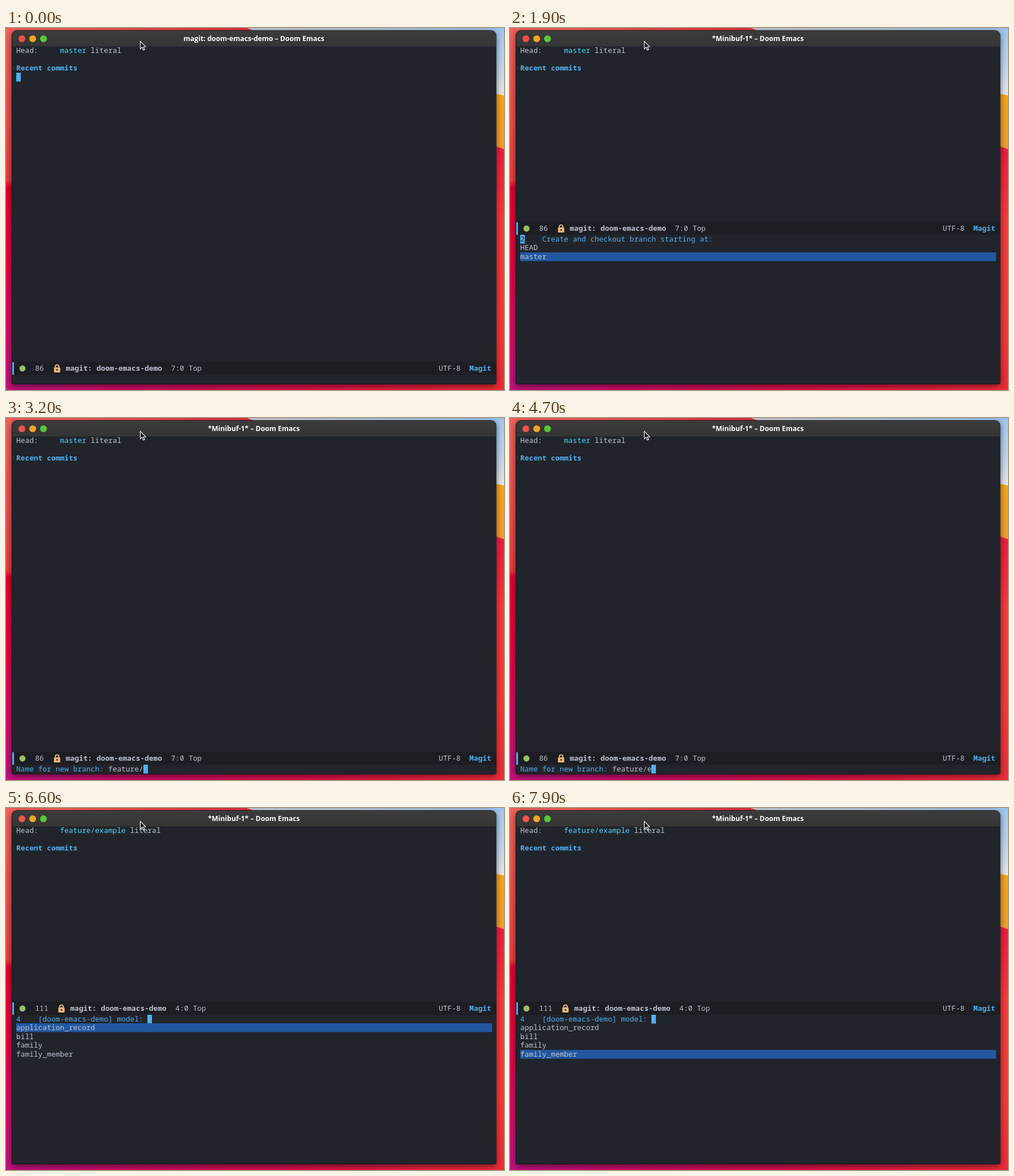
These frames come from a looping animation (877x639 px, 8000 ms). An HTML page with a canvas:

```html
<!DOCTYPE html>
<html lang="en">
<head>
<meta charset="utf-8">
<title>Branching in Magit</title>
<style>
html, body { margin: 0; width: 100%; height: 100%; overflow: hidden; background: #d01040; }
canvas { display: block; width: 877px; height: 639px; }
</style>
</head>
<body>
<canvas id="stage" width="877" height="639"></canvas>
<script>
const ctx = document.getElementById('stage').getContext('2d');
const LOOP = 8000, CELL = 7.712, ROW = 15.45, LEFT = 18;
const MONO = '12.85px "Noto Sans Mono", "DejaVu Sans Mono", monospace';
const UI = 'bold 12.2px "Open Sans", "Noto Sans", sans-serif';
const C = {
  bg: '#21242b', bar: '#1c1e23', text: '#bbc2cf', blue: '#51afef', cyan: '#46d9ff',
  green: '#98be65', lock: '#eab676', select: '#2257a0', dim: '#5b6268', key: '#c678dd'
};
const REPO = 'magit: doom-emacs-demo', MINI = '*Minibuf-1*';
const BRANCH = 'feature/example', PROMPT = 'Name for new branch: ';
const START = '2    Create and checkout branch starting at: ';
const MODEL = '4    [doom-emacs-demo] model: ';
const REFS = ['HEAD', 'master'];
const MODELS = ['application_record', 'bill', 'family', 'family_member'];

// [time, letters of the branch name typed so far]
const TYPED = [[2000, 0], [2100, 2], [2200, 3], [2400, 4], [2600, 6], [2800, 7], [3200, 8],
  [4700, 9], [5000, 10], [5100, 11], [5200, 12], [5400, 13], [5500, 15]];

function rect(x, y, w, h, color) {
  ctx.fillStyle = color;
  ctx.fillRect(x, y, w, h);
}

function disc(x, y, r, color) {
  ctx.fillStyle = color;
  ctx.beginPath();
  ctx.arc(x, y, r, 0, Math.PI * 2);
  ctx.fill();
}

function poly(points, color) {
  ctx.fillStyle = color;
  ctx.beginPath();
  points.forEach(p => ctx.lineTo(p[0], p[1]));
  ctx.closePath();
  ctx.fill();
}

function gradient(x0, y0, x1, y1, stops) {
  const g = ctx.createLinearGradient(x0, y0, x1, y1);
  stops.forEach(([at, color]) => g.addColorStop(at, color));
  return g;
}

// Monospaced text on the cell grid
function write(str, x, base, color, bold) {
  ctx.font = (bold ? 'bold ' : '') + MONO;
  ctx.textAlign = 'left';
  ctx.fillStyle = color;
  [...str].forEach((ch, i) => {
    if (ch !== ' ') ctx.fillText(ch, x + i * CELL, base);
  });
}

const col = n => LEFT + n * CELL;

function cursor(n, top) {
  rect(Math.round(col(n)), Math.round(top), 8, 15.5, C.blue);
}

function desktop() {
  rect(0, 0, 877, 639, gradient(0, 0, 0, 639, [[0, '#f4625a'], [0.3, '#ee4a48'],
    [0.42, '#f03c40'], [0.44, '#e4002f'], [0.62, '#ea0440'], [0.8, '#dc0a62'], [1, '#c21080']]));
  rect(0, 625, 877, 14, gradient(0, 0, 877, 0, [[0, '#c41280'], [0.3, '#cc0c60'],
    [0.6, '#dc1048'], [1, '#ee2c38']]));
  rect(100, 0, 400, 8, gradient(100, 0, 500, 0, [[0, 'rgba(222,40,56,0)'], [1, '#de2838']]));
  poly([[424, 0], [877, 0], [877, 130], [850, 130], [850, 10], [450, 10]],
    gradient(440, 0, 877, 0, [[0, '#c8ccd6'], [0.5, '#b4c8dc'], [1, '#9cc4ee']]));
  rect(850, 5, 27, 125, gradient(0, 5, 0, 118, [[0, '#a2c8f0'], [0.6, '#c4d8ee'], [1, '#e8e8ea']]));
  poly([[850, 114], [877, 119], [877, 214], [850, 205]],
    gradient(0, 115, 0, 214, [[0, '#f6a418'], [1, '#f0a030']]));
  poly([[850, 205], [877, 214], [877, 639], [850, 639]],
    gradient(0, 210, 0, 639, [[0, '#ee1c40'], [0.3, '#f83a3c'], [0.7, '#f63a38'], [1, '#ee2c38']]));
}

function shell(title) {
  ctx.save();
  ctx.shadowColor = 'rgba(0,0,0,.55)';
  ctx.shadowBlur = 12;
  ctx.shadowOffsetY = 3;
  ctx.fillStyle = '#15161a';
  ctx.beginPath();
  ctx.roundRect(10, 4, 853.5, 625, [9, 9, 3, 3]);
  ctx.fill();
  ctx.restore();
  ctx.fillStyle = gradient(0, 5, 0, 32, [[0, '#414141'], [0.1, '#3b3b3b'], [1, '#353535']]);
  ctx.beginPath();
  ctx.roundRect(11, 5, 852, 28, [8, 8, 0, 0]);
  ctx.fill();
  rect(11, 32.5, 852, 595.5, C.bg);
  disc(28, 19, 6, '#f0524a');
  disc(47, 19, 6, '#f1a61e');
  disc(66, 19, 6, '#57c936');
  ctx.font = UI;
  ctx.textAlign = 'center';
  ctx.fillStyle = '#fff';
  ctx.fillText(title + ' – Doom Emacs', 436.5, 23);
}

function status(branch) {
  write('Head:', LEFT, 44, C.text);
  write(branch, col(10), 44, C.cyan);
  write('literal', col(11 + branch.length), 44, C.text);
  write('Recent commits', LEFT, 75, C.blue, true);
  ctx.strokeStyle = '#444a53';
  ctx.lineWidth = 1;
  ctx.beginPath();
  ctx.moveTo(12.5, 68);
  ctx.lineTo(15, 70.5);
  ctx.lineTo(12.5, 73);
  ctx.stroke();
}

function padlock(x, y) {
  ctx.strokeStyle = C.lock;
  ctx.lineWidth = 1.8;
  ctx.beginPath();
  ctx.moveTo(x - 3.2, y);
  ctx.lineTo(x - 3.2, y - 3);
  ctx.arc(x, y - 3.2, 3.2, Math.PI, 0);
  ctx.lineTo(x + 3.2, y);
  ctx.stroke();
  ctx.fillStyle = C.lock;
  ctx.beginPath();
  ctx.roundRect(x - 5.5, y - 2, 11, 9, 1.3);
  ctx.fill();
  disc(x, y + 2.4, 1.4, C.bar);
}

function modeLine(top, size, place) {
  const shift = (size.length - 2) * CELL, base = top + 15;
  rect(11, top - 1, 852, 23, C.bar);
  rect(11, top, 3, 22, C.blue);
  disc(29, top + 11, 5.4, C.green);
  write(size, 51.3, base, C.text);
  padlock(90 + shift, top + 11);
  write(REPO, 105.3 + shift, base, C.text, true);
  write(place, 290.6 + shift, base, C.text);
  write('UTF-8', 762, base, C.text);
  write('Magit', 816, base, C.blue, true);
}

function picker(prompt, items, chosen, at = prompt.length) {
  cursor(at, 365);
  write(prompt, LEFT, 377, C.blue);
  if (at < prompt.length) write(prompt[at], col(at), 377, C.bg);
  items.forEach((item, i) => {
    const top = 365 + ROW * (i + 1);
    if (i === chosen) rect(LEFT, Math.round(top), 838, 15.5, C.select);
    write(item, LEFT, top + 12, C.text);
  });
}

function branchMenu() {
  const base = r => 437 + r * ROW;
  const entry = (c, r, key, label) => {
    write(key, col(c + 1), base(r), C.key);
    write(label, col(c + 3), base(r), C.text);
  };
  write('Configure master', LEFT, base(0), C.blue);
  [['d', 'description', 'unset'], ['u', 'merge', 'unset'], [' ', 'remote', 'unset'],
    ['r', 'rebase', '[true|false|default:false]'], ['p', 'pushRemote', '[]']
  ].forEach(([key, name, value], i) => {
    entry(0, i + 1, key, 'branch.master.' + name);
    write(value, col(29), base(i + 1), C.dim);
  });
  [[0, 'Checkout', 'b branch/revision', 'l local branch'],
    [21, '', 'c new branch', 's new spin-off'],
    [39, 'Create', 'n new branch', 'S new spin-out'],
    [57, 'Do', 'C configure...', 'm rename', 'x reset', 'k delete']
  ].forEach(([c, head, ...list]) => {
    write(head, col(c), base(7), C.blue);
    list.forEach((item, i) => entry(c, 8 + i, item[0], item.slice(2)));
  });
}

function pointer() {
  const p = [[236.5, 23.5], [236.5, 37], [239.7, 34], [242, 39], [244.2, 38], [242, 33.2], [246, 33]];
  poly(p, '#17181c');
  ctx.strokeStyle = '#fff';
  ctx.lineWidth = 1.1;
  ctx.stroke();
}

function draw(t) {
  const picking = t >= 600 && t < 2000, naming = t >= 2000 && t < 5700;
  const switched = t >= 5800, finding = t >= 6500, menu = t >= 300 && t < 600;
  const idle = t < 600 || (switched && !finding);
  const mini = (t >= 600 && t < 5800) || t >= 6600;

  desktop();
  shell(mini ? MINI : REPO);
  status(switched ? BRANCH : 'master');
  if (idle) cursor(0, 79);
  modeLine(picking || finding ? 343 : menu ? 403 : 590,
    switched ? '111' : '86', switched ? '4:0 Top' : '7:0 Top');

  if (menu) branchMenu();
  if (picking) picker(START, REFS, 1, t < 1900 ? START.length : 0);
  if (naming) {
    const n = TYPED.filter(step => step[0] <= t).pop()[1];
    write(PROMPT, LEFT, 624, C.blue);
    write(BRANCH.slice(0, n), col(PROMPT.length), 624, C.text);
    cursor(PROMPT.length + n, 612);
  }
  if (t >= 5700 && t < 5800) {
    write('File ~/doom-emacs-demo/config/locales/family.en.yml removed from the recentf list',
      LEFT, 624, C.text);
  }
  if (finding) picker(MODEL, MODELS, t < 7600 ? 0 : t < 7800 ? 1 : t < 7900 ? 2 : 3);
  pointer();
}

const begin = performance.now();
function tick() {
  draw((performance.now() - begin) % LOOP);
  requestAnimationFrame(tick);
}
tick();
</script>
</body>
</html>
```
